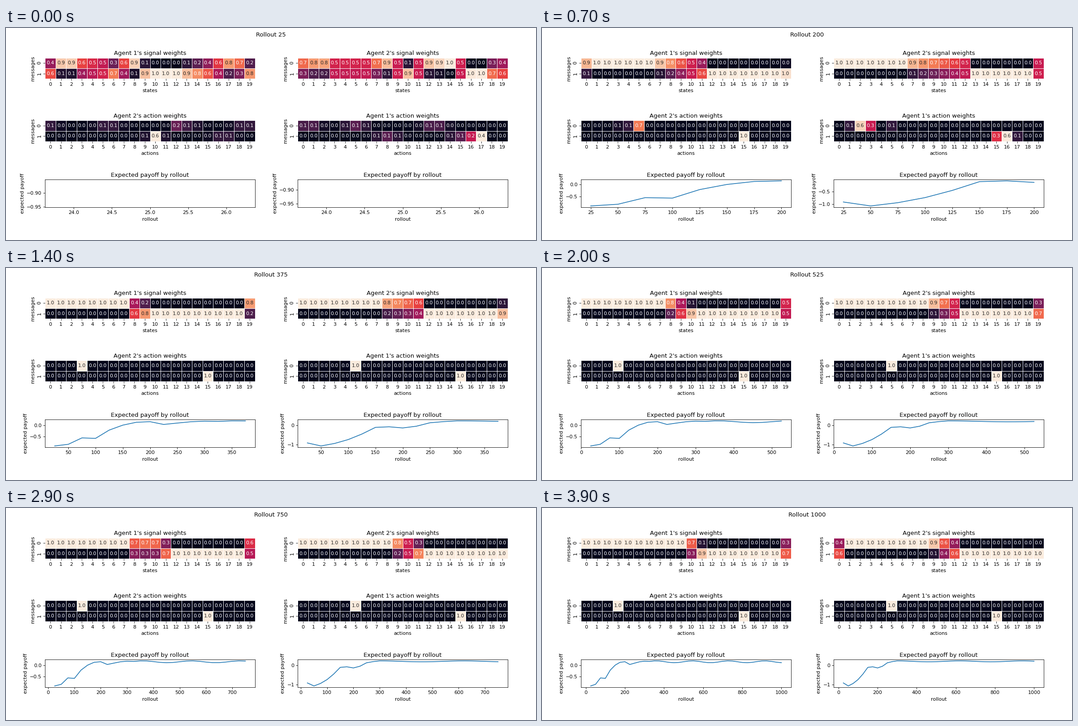
These frames come from a looping animation (1183x473 px, 4000 ms). A matplotlib script:

```python
import numpy as np
import matplotlib.pyplot as plt
from matplotlib.animation import FuncAnimation
from matplotlib.colors import LinearSegmentedColormap

W, H, DPI = 1183, 473, 78.87
FRAMES, STEP = 40, 25
N = 20
STATES = np.arange(N)
ROLLOUTS = STEP * np.arange(1, FRAMES + 1)

plt.rcParams["font.family"] = "DejaVu Sans"

ROCKET = LinearSegmentedColormap.from_list("rocket", [
    (0, "#03051a"), (1 / 7, "#35193e"), (0.2, "#4c1d4b"), (0.25, "#611f53"),
    (2 / 7, "#701f57"), (0.4, "#a11a5b"), (3 / 7, "#ad1759"), (0.5, "#cb1b4f"),
    (4 / 7, "#e13342"), (0.6, "#e83f3f"), (5 / 7, "#f37651"), (0.75, "#f4875e"),
    (0.8, "#f69c73"), (6 / 7, "#f6b48f"), (1, "#faebdd")])


def pair(row):
    return np.array([row, 1 - row])


def curve(points):
    """Early signal weights, drawn through a few states."""
    return pair(np.interp(STATES, list(points), list(points.values())))


def ramp(start, high, end, low, last=0.0, first=1.0):
    """Learned signal weights: one, then a slope from high to low, then zero."""
    row = np.interp(STATES, [start, end], [high, low])
    row[:start], row[end + 1:] = 1, 0
    row[0], row[-1] = first, last
    return pair(row)


def bumps(centres):
    """Faint action weights gathered around some actions."""
    gaps = STATES[:, None] - np.array(centres)
    return .01 + .09 * np.exp(-(gaps / 1.2) ** 2).sum(axis=1)


def peaks(top, bottom, base=None):
    """Action weights that stand out from a base, per message."""
    rows = np.zeros((2, N)) if base is None else np.array(base)
    for row, weights in zip(rows, (top, bottom)):
        row[list(weights)] = list(weights.values())
    return rows


KEYS = [0, 7, 14, 20, 25, 33, 39]
SIGNAL_1 = [
    curve({0: .38, 1: .9, 2: .91, 3: .6, 5: .48, 6: .28, 8: .92, 9: .12,
           10: .01, 12: .01, 15: .36, 17: .79, 18: .68, 19: .22}),
    ramp(7, .9, 11, .38, .03, .86),
    ramp(8, .42, 9, .21, .8),
    ramp(8, .76, 10, .1, .52),
    ramp(8, .32, 11, .55, .62),
    ramp(10, .88, 11, .1, .48),
    ramp(10, .66, 11, .1, .34),
]
SIGNAL_2 = [
    curve({0: .68, 1: .79, 2: .81, 3: .52, 6: .52, 8: .87, 10: .12, 12: .89,
           14: .99, 16: .02, 17: .01, 18: .31, 19: .4}),
    ramp(7, .86, 12, .52, .49),
    ramp(8, .82, 11, .6, .12),
    ramp(9, .88, 11, .52, .31),
    ramp(9, .92, 11, .21),
    ramp(9, .59, 11, .31),
    ramp(9, .91, 11, .37, 0, .38),
]
ACTION_2 = [
    peaks({12: .16}, {10: .57}, [bumps([-.5, 5.5, 13, 18.5]), bumps([10, 16.5])]),
    peaks({3: .06, 4: .13, 5: .72}, {15: 1}),
] + [peaks({3: 1}, {15: 1})] * 5
ACTION_1 = [
    peaks({}, {16: .2, 17: .4}, [bumps([.5, 5, 12.5]), bumps([8, 15])]),
    peaks({1: .08, 2: .57, 3: .3, 5: .08}, {15: .34, 16: .61, 17: .08}),
] + [peaks({5: 1}, {15: 1})] * 5


def payoff(rise, level, swing, crest, period):
    """A climb through the given values, then a gentle ripple."""
    values = level + swing * np.cos(2 * np.pi * (ROLLOUTS - crest) / period)
    values[:len(rise)] = rise
    return values


PAYOFF_1 = payoff([-.901, -.83, -.553, -.573, -.215, 0, .125, .15, .03, .09, .147, .172],
                  .147, .04, 730, 185)
PAYOFF_2 = payoff([-.913, -1.07, -.94, -.737, -.45, -.1, -.07, -.13, -.04, .14, .2],
                  .214, .025, 620, 320)


def blend(poses, i):
    k = min(np.searchsorted(KEYS, i, side="right") - 1, len(KEYS) - 2)
    t = (i - KEYS[k]) / (KEYS[k + 1] - KEYS[k])
    return (1 - t) * poses[k] + t * poses[k + 1]


def ink(rgba):
    """Dark text on light cells, white on dark ones."""
    c = np.asarray(rgba[:3])
    lin = np.where(c <= .03928, c / 12.92, ((c + .055) / 1.055) ** 2.4)
    return ".15" if lin @ [.2126, .7152, .0722] > .408 else "w"


fig = plt.figure(figsize=((W + .001) / DPI, (H + .001) / DPI), dpi=DPI,
                 facecolor="white")
heading = fig.suptitle("")


def panel(left, top, height, title, xlabel, ylabel):
    ax = fig.add_axes([left / W, 1 - (top + height) / H, 468.2 / W, height / H])
    ax.set_title(title)
    ax.set_xlabel(xlabel)
    ax.set_ylabel(ylabel)
    return ax


class Heatmap:
    def __init__(self, left, top, title, xlabel, poses):
        ax = panel(left, top, 46.8, title, xlabel, "messages")
        self.poses = poses
        self.mesh = ax.pcolormesh(np.zeros((2, N)), cmap=ROCKET,
                                  edgecolors="white", linewidth=.5)
        ax.set(xlim=(0, N), ylim=(2, 0))
        ax.set_xticks(STATES + .5, STATES)
        ax.set_yticks([.5, 1.5], [0, 1], rotation=90)
        ax.spines[:].set_visible(False)
        self.labels = [ax.text(c + .5, r + .5, "", ha="center", va="center")
                       for r in range(2) for c in range(N)]

    def update(self, i):
        data = blend(self.poses, i)
        self.mesh.set_array(data)
        self.mesh.set_clim(data.min(), data.max())
        colors = self.mesh.to_rgba(data.ravel())
        for label, v, rgba in zip(self.labels, data.ravel(), colors):
            label.set_text(f"{v:.1f}")
            label.set_color(ink(rgba))


class Payoff:
    def __init__(self, left, values):
        self.ax = panel(left, 338.3, 61.5, "Expected payoff by rollout",
                        "rollout", "expected payoff")
        self.values = values
        self.line, = self.ax.plot([], [])

    def update(self, i):
        self.line.set_data(ROLLOUTS[:i + 1], self.values[:i + 1])
        self.ax.relim()
        self.ax.autoscale_view()


LEFT, RIGHT = 87.4, 651.4
SIGNAL_TOP, ACTION_TOP = 66.6, 206.2
parts = [
    Heatmap(LEFT, SIGNAL_TOP, "Agent 1's signal weights", "states", SIGNAL_1),
    Heatmap(RIGHT, SIGNAL_TOP, "Agent 2's signal weights", "states", SIGNAL_2),
    Heatmap(LEFT, ACTION_TOP, "Agent 2's action weights", "actions", ACTION_2),
    Heatmap(RIGHT, ACTION_TOP, "Agent 1's action weights", "actions", ACTION_1),
    Payoff(LEFT, PAYOFF_1),
    Payoff(RIGHT, PAYOFF_2),
]


def draw(i):
    heading.set_text(f"Rollout {STEP * (i + 1)}")
    for part in parts:
        part.update(i)
    return []


anim = FuncAnimation(fig, draw, frames=FRAMES, interval=100, repeat=True,
                     repeat_delay=0, init_func=lambda: draw(0))
plt.show()
```
